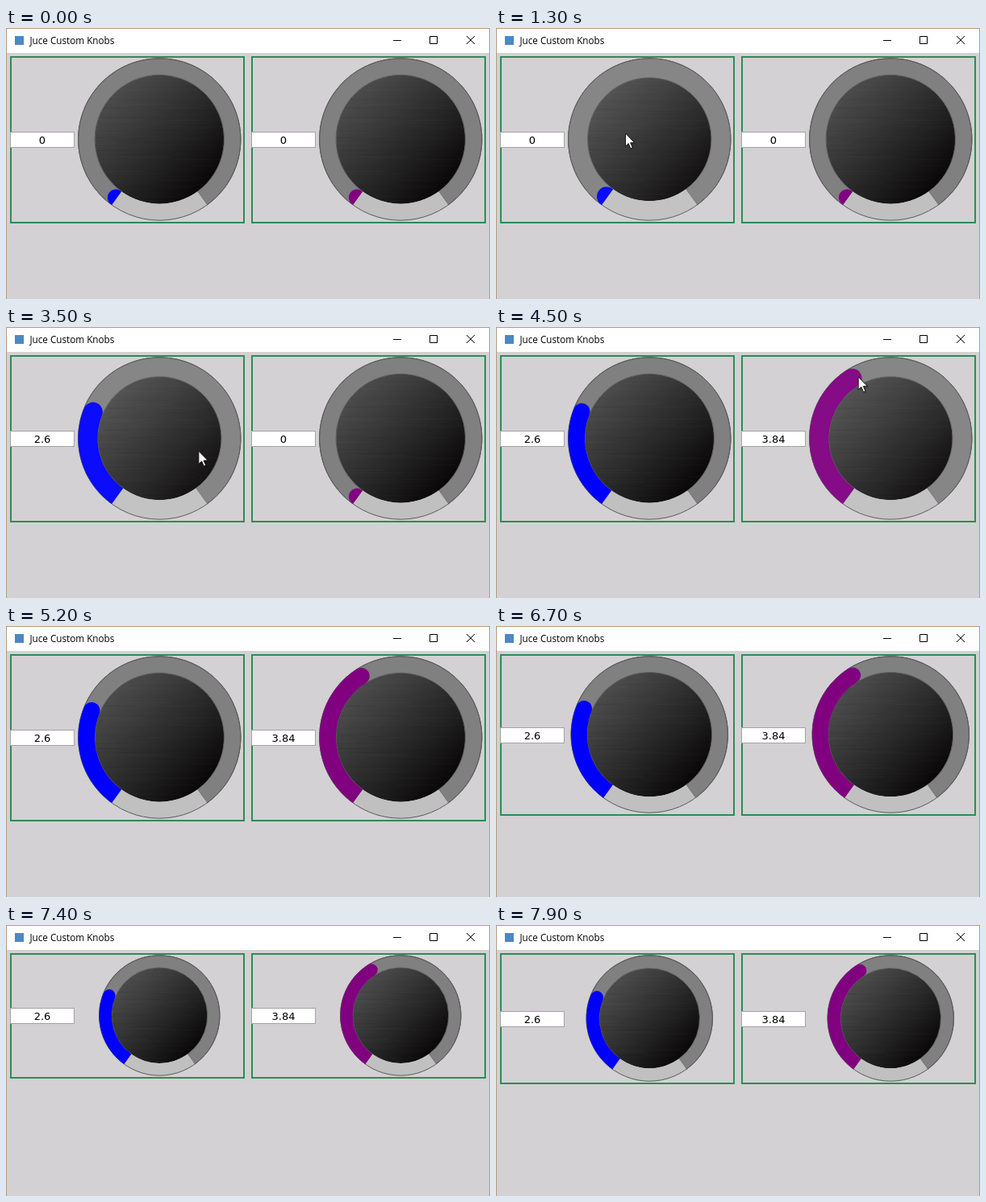
An HTML page with a canvas for the animation above (8 s loop, 600 by 337 pixels).

```html
<!DOCTYPE html>
<html lang="en">
<head>
<meta charset="utf-8">
<title>Juce Custom Knobs</title>
<style>
  html, body { margin: 0; width: 100%; height: 100%; overflow: hidden; background: #d3d1d3; }
  canvas { display: block; width: 600px; height: 337px; }
</style>
</head>
<body>
<canvas id="stage" width="600" height="337"></canvas>
<script>
const ctx = document.getElementById('stage').getContext('2d');
const LOOP = 8000, STEP = 100, FADE = 300;
const START = 1.2 * Math.PI, SWEEP = 1.6 * Math.PI, TOP = -Math.PI / 2;

const left = {
  x: 0, color: '#0000ff', goal: 2.6, drag: [1700, 2100],
  visits: [[900, 2300], [3100, 3500]]
};
const right = {
  x: 299, color: '#800080', goal: 3.84, drag: [4000, 4500],
  visits: [[2500, 2900], [3500, 4700]]
};

const ramp = (t, from, to) => Math.min(1, Math.max(0, (t - from) / (to - from)));
const mix = (a, b, k) => a + (b - a) * k;
const valueAt = (knob, t) => knob.goal * ramp(t, ...knob.drag);
const hoverAt = (knob, t) => Math.max(...knob.visits.map(([enter, leave]) =>
  ramp(t, enter, enter + FADE) - ramp(t, leave, leave + FADE)));
const panelHeight = t =>
  Math.floor(206 - 52 * ramp(t, 6600, 7400) + 7 * ramp(t, 7400, 7900));
const arcEnd = value => START + SWEEP * value / 10 + 0.015;

function geometry(knob, height) {
  return { cx: knob.x + 190.25, cy: 35.5 + height / 2, outer: height / 2 - 2.3 };
}

// The pointer holds the tip of the value arc while dragging.
function grip(knob, t) {
  const { cx, cy, outer } = geometry(knob, 206);
  const a = arcEnd(valueAt(knob, t)) + 0.08 + TOP;
  return [cx + 0.86 * outer * Math.cos(a), cy + 0.86 * outer * Math.sin(a)];
}

function cursorAt(t) {
  const moves = [
    [700, 1300, [160, 131]],
    [1500, 1700, grip(left, t)],
    [2300, 2700, [447, 151]],
    [2800, 3300, [190, 142]],
    [3400, 3900, grip(right, t)],
    [4600, 5200, [428, 345]]
  ];
  return moves.reduce(([x, y], [from, to, goal]) => {
    const k = ramp(t, from, to);
    return [mix(x, goal[0], k), mix(y, goal[1], k)];
  }, [214, 318]);
}

function random(seed) {
  const n = Math.sin(seed * 12.9898) * 43758.5453;
  return n - Math.floor(n);
}

function ringPath(cx, cy, inner, outer, from, to, rounded) {
  ctx.beginPath();
  ctx.arc(cx, cy, outer, from + TOP, to + TOP);
  if (rounded) {
    const mid = (inner + outer) / 2, a = to + TOP;
    ctx.arc(cx + mid * Math.cos(a), cy + mid * Math.sin(a), (outer - inner) / 2, a, a + Math.PI);
  }
  ctx.arc(cx, cy, inner, to + TOP, from + TOP, true);
  ctx.closePath();
}

function circlePath(cx, cy, r) {
  ctx.beginPath();
  ctx.arc(cx, cy, r, 0, 2 * Math.PI);
}

function drawCap(cx, cy, r) {
  const d = r * 0.72;
  const metal = ctx.createLinearGradient(cx - d, cy - d, cx + d, cy + d);
  ['#4c4c4c', '#373737', '#212020', '#080606'].forEach((c, i) => metal.addColorStop(i / 3, c));
  ctx.save();
  circlePath(cx, cy, r);
  ctx.fillStyle = metal;
  ctx.fill();
  ctx.clip();
  for (let i = 0; i < 80; i++) {
    const x = cx + (random(i) * 2 - 1.4) * r, y = cy + (random(i + 200) * 2 - 1) * r;
    ctx.fillStyle = random(i + 400) > 0.5 ? 'rgba(255,255,255,.02)' : 'rgba(0,0,0,.06)';
    ctx.fillRect(x, y, r * (0.3 + random(i + 600) * 0.8), 1);
  }
  ctx.restore();
}

function drawKnob(knob, t) {
  const height = panelHeight(t), value = valueAt(knob, t), hover = hoverAt(knob, t);
  const { cx, cy, outer } = geometry(knob, height);
  const inner = outer * (0.796 - 0.034 * hover), end = START + SWEEP;

  ctx.lineWidth = 2;
  ctx.strokeStyle = '#2e8b57';
  ctx.strokeRect(knob.x + 6, 36, 289, height);

  ctx.lineWidth = 1;
  ctx.strokeStyle = '#5b5a5b';
  drawCap(cx, cy, inner);
  ringPath(cx, cy, inner, outer, START, end);
  ctx.fillStyle = '#808080';
  ctx.fill();
  ctx.stroke();
  ringPath(cx, cy, inner, outer, end, START + 2 * Math.PI);
  ctx.fillStyle = '#c1c0c1';
  ctx.fill();
  circlePath(cx, cy, outer);
  ctx.stroke();
  ringPath(cx, cy, inner, outer, START, arcEnd(value), true);
  ctx.fillStyle = knob.color;
  ctx.fill();
  circlePath(cx, cy, outer);
  ctx.fillStyle = `rgba(255,255,255,${0.045 * hover})`;
  ctx.fill();

  const top = Math.round(36 + height / 2 - 10);
  ctx.fillStyle = '#ffffff';
  ctx.fillRect(knob.x + 5, top, 80, 20);
  ctx.strokeStyle = '#a4a3a4';
  ctx.strokeRect(knob.x + 5.5, top + 0.5, 79, 19);
  ctx.fillStyle = '#000000';
  ctx.font = '13px "DejaVu Sans", sans-serif';
  ctx.textAlign = 'center';
  ctx.fillText(String(+value.toFixed(2)), knob.x + 45, top + 15);
}

function drawWindow() {
  ctx.fillStyle = '#d3d1d3';
  ctx.fillRect(0, 0, 600, 337);
  ctx.fillStyle = '#ffffff';
  ctx.fillRect(0, 0, 600, 31);
  ctx.strokeStyle = '#b39c7c';
  ctx.lineWidth = 1;
  ctx.strokeRect(0.5, 0.5, 599, 340);

  ctx.fillStyle = '#4b88c4';
  ctx.fillRect(11, 10, 11, 11);
  ctx.fillStyle = '#000000';
  ctx.font = '11.7px "Open Sans", sans-serif';
  ctx.textAlign = 'left';
  ctx.fillText('Juce Custom Knobs', 29.5, 20);

  ctx.strokeStyle = '#000000';
  ctx.beginPath();
  ctx.moveTo(480, 15.5);
  ctx.lineTo(490, 15.5);
  ctx.rect(525.5, 10.5, 9, 9);
  ctx.moveTo(571, 10);
  ctx.lineTo(581, 20);
  ctx.moveTo(581, 10);
  ctx.lineTo(571, 20);
  ctx.stroke();
}

function drawCursor(x, y) {
  ctx.save();
  ctx.translate(x + 0.5, y);
  ctx.shadowColor = 'rgba(0,0,0,.35)';
  ctx.shadowBlur = 2;
  ctx.shadowOffsetX = ctx.shadowOffsetY = 1;
  const arrow = new Path2D('M0 0V16L3.7 12.6 6.4 18.8 8.8 17.7 6.2 11.7H11.3Z');
  ctx.fillStyle = '#ffffff';
  ctx.fill(arrow);
  ctx.shadowColor = 'transparent';
  ctx.strokeStyle = '#161616';
  ctx.lineWidth = 1;
  ctx.stroke(arrow);
  ctx.restore();
}

function render(now) {
  const t = Math.floor((now % LOOP) / STEP) * STEP;
  drawWindow();
  drawKnob(left, t);
  drawKnob(right, t);
  if (t >= 700 && t < 5200) drawCursor(...cursorAt(t));
  requestAnimationFrame(render);
}
requestAnimationFrame(render);
</script>
</body>
</html>
```
